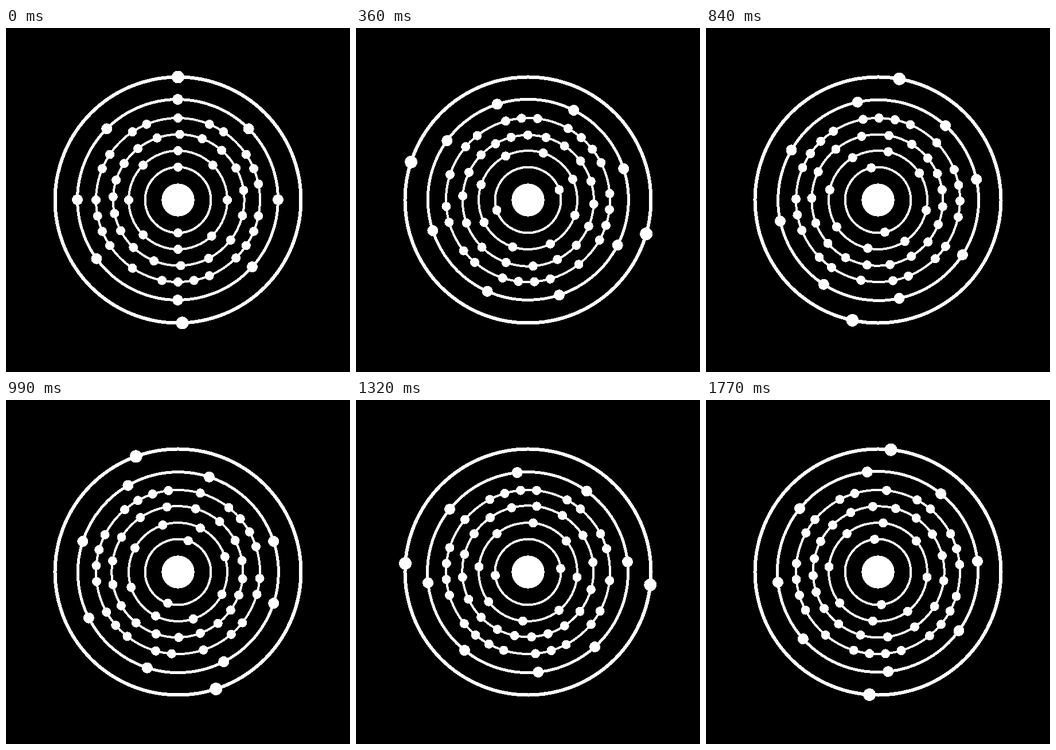
An HTML page that plays this animation: 600 px wide and 600 px high, repeating every 1800 ms.

```html
<!DOCTYPE html>
<html lang="en">
<head>
<meta charset="utf-8">
<title>Electron shells</title>
<style>
  html, body { margin: 0; height: 100%; overflow: hidden; background: #000; }
  svg { display: block; }
</style>
</head>
<body>
<svg width="600" height="600" viewBox="-300 -300 600 600" fill="#fff" stroke="none" shape-rendering="crispEdges"></svg>
<script>
const LOOP = 1800, STEP = 30;
const svg = document.querySelector('svg');
const rad = deg => deg * Math.PI / 180;

// Angles are in degrees clockwise from the top.
const spread = (count, place) => Array.from({ length: count }, (_, k) => place(k * 360 / count, k));
const even = (count, nudge = {}) => spread(count, (angle, k) => angle + (nudge[k] || 0));

// Crowded towards the upper left, sparse towards the lower right.
const bunched = spread(18, angle => {
  const u = rad(angle - 200);
  return angle + 8.9 + 11.3 * Math.cos(u) + 3.4 * Math.cos(2 * u);
});

// 32 equal slots, some of them empty.
const empty = [1, 4, 8, 13, 18, 20, 25, 28, 31];
const slotted = even(32).filter((_, k) => !empty.includes(k));

const shells = [
  { radius: 57.3, line: 4, dot: 8, angles: even(2) },
  { radius: 86, line: 4, dot: 8, angles: even(8, { 3: 2 }) },
  { radius: 114.5, line: 4, dot: 8, angles: bunched, x: 1.2 },
  { radius: 143, line: 4, dot: 8, angles: slotted },
  { radius: 175, line: 5, dot: 9.5, angles: even(8, { 3: -3, 5: 9 }), x: -0.5, y: -0.5 },
  { radius: 214.5, line: 6, dot: 11, angles: even(2, { 1: -2 }) }
];

function add(parent, tag, attrs = {}) {
  const node = document.createElementNS(svg.namespaceURI, tag);
  for (const name in attrs) node.setAttribute(name, attrs[name]);
  return parent.appendChild(node);
}

add(svg, 'circle', { r: 28.7 });

// x and y set a shell slightly off its axis, so that it wobbles as it turns.
const groups = shells.map(({ radius, line, dot, angles, x = 0, y = 0 }) => {
  const group = add(svg, 'g');
  add(group, 'circle', { cx: x, cy: y, r: radius, fill: 'none', stroke: '#fff', 'stroke-width': line });
  for (const angle of angles) {
    const a = rad(angle);
    add(group, 'circle', { cx: x + radius * Math.sin(a), cy: y - radius * Math.cos(a), r: dot });
  }
  return group;
});

const start = performance.now();
function tick() {
  const time = (performance.now() - start) % LOOP;
  const turn = Math.floor(time / STEP) * STEP / LOOP * 360;
  // Neighbouring shells turn opposite ways.
  groups.forEach((group, i) => group.setAttribute('transform', `rotate(${i % 2 ? -turn : turn})`));
  requestAnimationFrame(tick);
}
tick();
</script>
</body>
</html>
```
